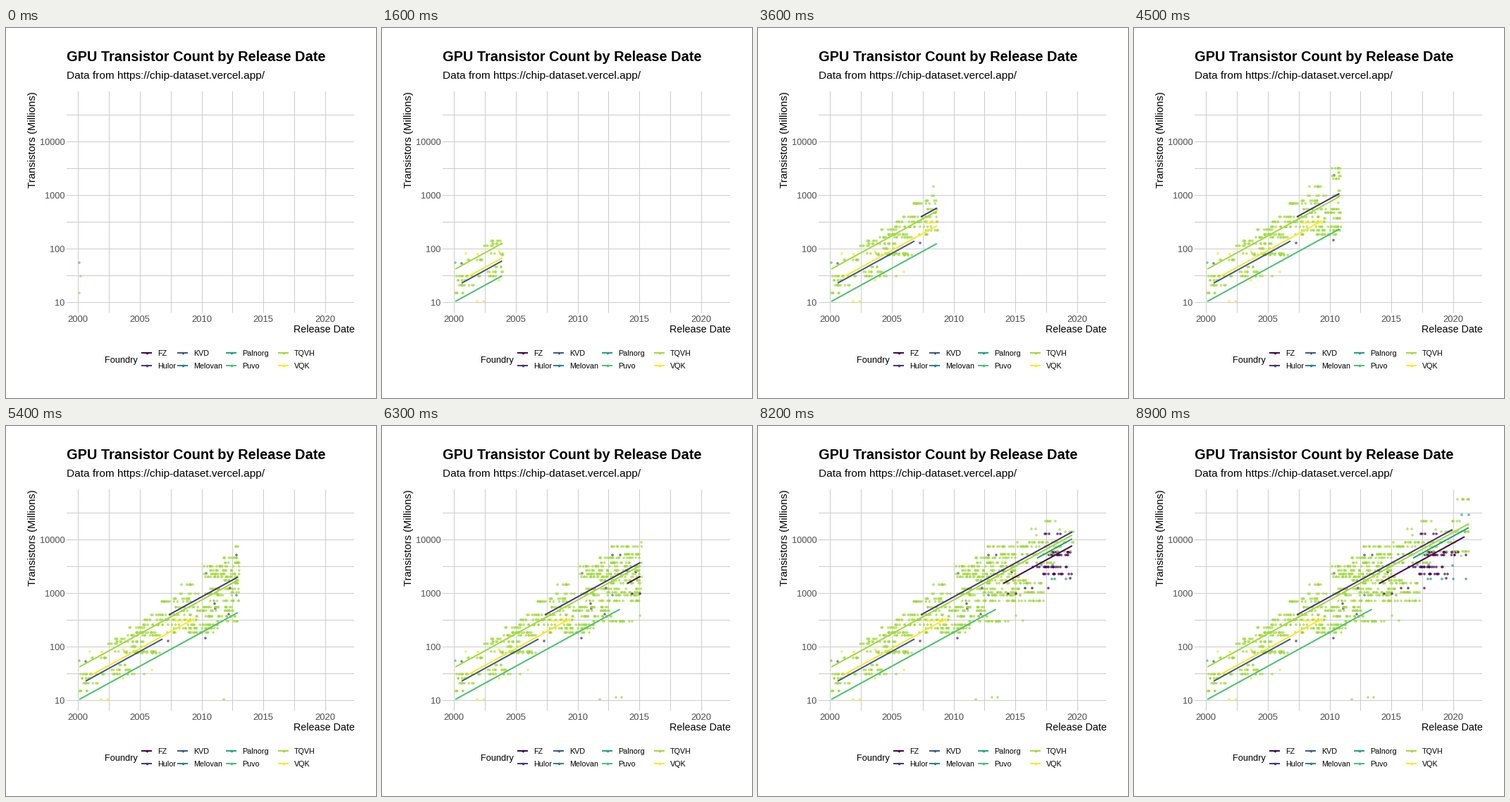
A matplotlib script that plays this animation: 525x525 px, repeating every 10000 ms.

```python
import numpy as np
import matplotlib.pyplot as plt
from matplotlib.animation import FuncAnimation
from matplotlib.colors import to_rgba

SIZE = 525
DPI = 100
PX = 72 / DPI              # points per pixel
FRAMES, INTERVAL = 100, 100
LAST_STEP = 89             # the chart is complete here and then rests
START, STEP = 103.8, 4.17  # reveal front, in pixels
SLOPE = -0.548             # shared by all trend lines
ALPHA = 0.62
GRID = "#cccccc"
TICK = "#4d4d4d"

FOUNDRIES = ["FZ", "Hulor", "KVD", "Melovan", "Palnorg", "Puvo", "TQVH", "VQK"]
COLORS = ["#440154", "#46337e", "#365c8d", "#277f8e",
          "#1fa187", "#4ac16d", "#9fda3a", "#fde725"]
PALETTE = dict(zip(FOUNDRIES, COLORS))

# Trend lines: x start, y start, x end
TRENDS = {
    "FZ": (348, 223.5, 469),
    "Hulor": (231, 268, 452),
    "KVD": (113, 362, 222),
    "Palnorg": (396, 187.5, 475),
    "Puvo": (104, 388, 337.5),
    "TQVH": (104, 342, 475),
    "VQK": (120, 354, 267),
}

# Runs of chips sharing one transistor count: y, x start, x end
TQVH_RUNS = [
    (376, 104, 115), (365, 110, 130), (358, 108, 119), (352, 105.7, 139),
    (329, 122, 142), (309, 145, 157), (302, 155, 168), (306, 157, 195),
    (320, 155, 212), (346, 150, 176), (339, 161, 169), (352, 152, 182),
    (286, 175, 196), (297, 173, 218), (293, 185, 294), (313, 178, 192),
    (275, 197, 270), (268, 206, 262), (282, 195, 300), (322, 170, 218),
    (249, 221, 262), (245, 238, 260), (225, 249, 265), (238, 247, 300),
    (257, 241, 320), (262, 250, 322), (287, 238, 300), (199, 281, 365),
    (210, 281, 365), (205, 290, 365), (187, 309, 365), (171, 326, 430),
    (194, 311, 420), (214, 283, 370), (219, 310, 380), (223, 325, 402),
    (231, 290, 370), (236, 320, 405), (240, 300, 372), (248, 290, 400),
    (270, 270, 325), (277, 300, 355), (182, 345, 420), (165, 385, 455),
    (135, 408, 422), (135, 452, 462), (104, 459, 475), (150, 436, 475),
    (178, 415, 475),
]
FZ_RUNS = [(200, 390, 412), (200, 416, 438), (210, 405, 412), (210, 419, 445),
           (179, 418, 460), (183, 413, 455), (153, 407, 413)]
VQK_RUNS = [(276, 240, 267)]

# Single chips: x, y
SINGLES = {
    "FZ": [(355, 238), (366, 238), (360, 207), (379, 230), (389, 230),
           (412, 230), (425, 153), (429, 153), (443, 216), (471, 183)],
    "Hulor": [(230, 305), (283, 301), (284, 209), (296, 252), (297, 259),
              (316, 267), (318, 230), (327, 183), (338, 183), (348, 205)],
    "KVD": [(113, 334)],
    "Melovan": [(327, 240)],
    "Palnorg": [(402, 197), (418, 197), (417, 217), (421, 217), (437, 217),
                (453, 217), (471, 217), (452, 198), (465, 126), (475, 126),
                (470, 150)],
    "Puvo": [(104, 333), (277, 293)],
    "TQVH": [(196, 352), (309, 388), (332, 385), (340, 385), (368, 165),
             (366, 269), (376, 276), (405, 248), (388, 146), (394, 146),
             (395, 155), (428, 147), (464, 184), (474, 140)],
    "VQK": [(119, 320), (136, 321), (113, 358), (135, 388), (144, 388),
            (130, 352), (158, 346), (173, 346), (166, 358), (166, 317),
            (207, 346)],
}


def spread(runs, rng):
    """Scatter chips along each run, always keeping both ends."""
    chips = []
    for y, x0, x1 in runs:
        inner = rng.uniform(x0, x1, int(0.33 * (x1 - x0)))
        chips += [(x, y) for x in (x0, *inner, x1)]
    return chips


def build_chips():
    rng = np.random.default_rng(12)
    chips = {name: list(points) for name, points in SINGLES.items()}
    for name, runs in (("TQVH", TQVH_RUNS), ("FZ", FZ_RUNS), ("VQK", VQK_RUNS)):
        chips[name] += spread(runs, rng)
    rows = [(x, y, *to_rgba(PALETTE[name], ALPHA))
            for name, points in chips.items() for x, y in points]
    return np.array(sorted(rows, key=lambda row: row[0]))


fig = plt.figure(figsize=(SIZE / DPI, SIZE / DPI), dpi=DPI, facecolor="white")
ax = fig.add_axes([0, 0, 1, 1])
ax.set_xlim(0, SIZE)
ax.set_ylim(SIZE, 0)
ax.axis("off")


def label(x, y, text, size, **kw):
    ax.text(x, y, text, fontsize=size * PX, family="Liberation Sans",
            va="baseline", rotation_mode="anchor", **kw)


def dots(x, y, colors, zorder):
    return ax.scatter(x, y, s=(2.7 * PX) ** 2, c=colors,
                      linewidths=0.9 * PX, zorder=zorder)


def draw_grid():
    for i in range(9):
        x = int(101.6 + 43.87 * i) + 0.5
        ax.plot([x, x], [90, 403], color=GRID, lw=PX, zorder=1)
        if i % 2 == 0:
            label(x + 0.5, 417, str(2000 + 5 * i // 2), 13, color=TICK, ha="center")
    for i in range(8):
        y = 388.5 - 38 * i
        ax.plot([86, 493], [y, y], color=GRID, lw=PX, zorder=1)
        if i % 2 == 0:
            label(83.5, y + 5, str(10 ** (1 + i // 2)), 12.8, color=TICK, ha="right")


def draw_legend():
    label(140, 475, "Foundry", 12.8)
    for i, name in enumerate(FOUNDRIES):
        x = (192, 243, 312, 386)[i // 2]
        y = 460.5 + 18 * (i % 2)
        ax.plot([x, x + 15], [y, y], color=PALETTE[name], lw=2 * PX,
                solid_capstyle="butt")
        dots([x + 7.5], [y], [PALETTE[name]], 4)
        label(x + 23, y + 4.5, name, 10.7)


draw_grid()
draw_legend()
label(86, 47, "GPU Transistor Count by Release Date", 19.95, weight="bold")
label(86, 72, "Data from https://chip-dataset.vercel.app/", 15.37)
label(42, 90, "Transistors (Millions)", 14.8, rotation=90, ha="right")
label(494.5, 432, "Release Date", 14.2, ha="right")

chips = build_chips()
cloud = dots(chips[:, 0], chips[:, 1], chips[:, 2:], 2)
trends = {name: ax.plot([], [], color=PALETTE[name], lw=2 * PX, zorder=3,
                        solid_capstyle="butt")[0] for name in TRENDS}


def update(frame):
    step = min(frame, LAST_STEP)
    front = START + STEP * step
    shown = chips[chips[:, 0] <= front + STEP / 2]
    cloud.set_offsets(shown[:, :2])
    cloud.set_facecolors(shown[:, 2:])
    cloud.set_edgecolors(shown[:, 2:])
    for name, (x0, y0, x1) in TRENDS.items():
        head = min(front, x1)
        if head > x0:
            trends[name].set_data([x0, head], [y0, y0 + SLOPE * (head - x0)])
        else:
            trends[name].set_data([], [])
    return [cloud, *trends.values()]


anim = FuncAnimation(fig, update, frames=FRAMES, interval=INTERVAL,
                     repeat=True, repeat_delay=0)
plt.show()
```
